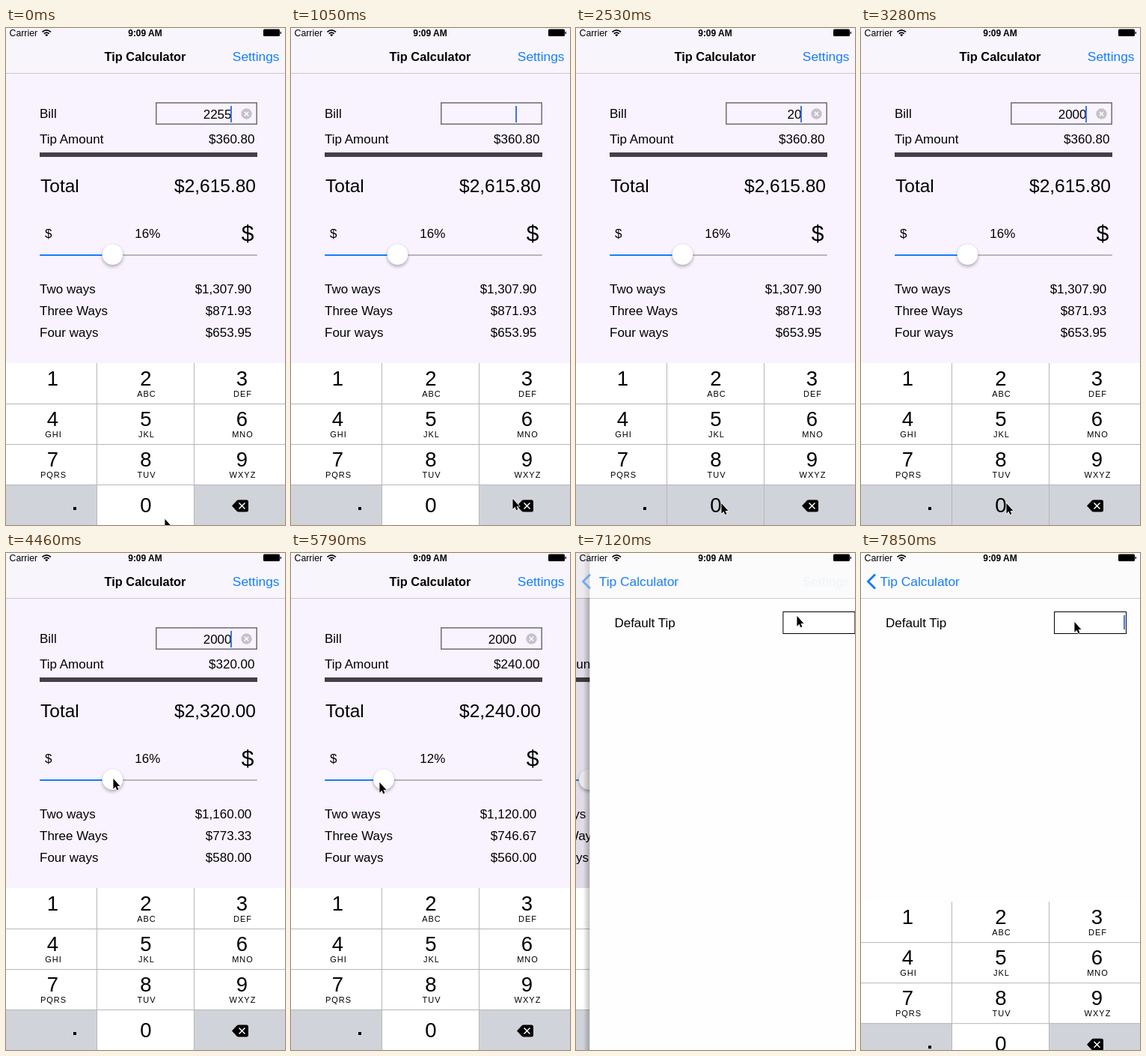
An HTML page for the animation above (8000 ms loop, 373 by 663 pixels).

```html
<!DOCTYPE html>
<html lang="en">
<head>
<meta charset="utf-8">
<title>Tip Calculator</title>
<style>
  html, body { margin: 0; width: 100%; height: 100%; overflow: hidden; background: #fff; }
  svg { display: block; width: 373px; height: 663px; }
  text { font-family: "Liberation Sans", Arial, sans-serif; font-size: 17px; fill: #000; white-space: pre; }
  .end { text-anchor: end; }
  .mid { text-anchor: middle; }
  .big { font-size: 24.5px; }
  .blue { fill: #167efb; font-size: 17.35px; }
  .bold { font-weight: bold; font-size: 16.4px; }
  .digit { font-size: 27.5px; text-anchor: middle; }
  .abc { font-size: 11px; letter-spacing: 1px; text-anchor: middle; }
</style>
</head>
<body>
<svg id="stage" viewBox="0 0 373 663"></svg>
<script>
const LOOP = 8000, STEPS = 54, W = 373;
const GREY = '#d0d3da';

const rect = (x, y, w, h, fill, more = '') =>
  `<rect x="${x}" y="${y}" width="${w}" height="${h}" fill="${fill}" ${more}/>`;
const text = (x, y, str, cls = '', more = '') =>
  `<text x="${x}" y="${y}" class="${cls}" ${more}>${str}</text>`;

function keypad(id) {
  const mids = [62.5, 187, 315.5];
  const letters = ['', 'ABC', 'DEF', 'GHI', 'JKL', 'MNO', 'PQRS', 'TUV', 'WXYZ'];
  let s = rect(0, 447, W, 216, '#fff') + rect(0, 609, 122, 54, GREY);
  s += rect(122, 447, 130, 54, '#fff', `id="${id}2"`);
  s += rect(122, 609, 130, 54, '#fff', `id="${id}0"`);
  s += rect(252, 609, 121, 54, GREY, `id="${id}Del"`);
  for (const y of [501, 555, 609]) s += rect(0, y, W, 1, '#b6b7bc');
  for (const x of [121, 251]) s += rect(x, 447, 1, 216, '#b6b7bc');
  letters.forEach((abc, i) => {
    const x = mids[i % 3], y = 477 + 54 * Math.floor(i / 3);
    s += text(x, y, i + 1, 'digit') + text(x + 1, y + 15, abc, 'abc');
  });
  s += text(187, 646, 0, 'digit') + rect(90, 639, 4, 4, '#000');
  s += '<path d="M302 637.5L308.5 630.5Q309.5 629.5 311 629.5H321.5Q324 629.5 324 632V643Q324 645.5 321.5 645.5H311Q309.5 645.5 308.5 644.5Z"/>';
  s += '<path d="M311.5 633.5l8 8m0 -8l-8 8" stroke="#fff" stroke-width="1.5"/>';
  return `<g id="${id}">${s}</g>`;
}

const billPage = `<g id="billPage">
  ${rect(0, 0, W, 663, '#f8f3ff')}
  ${text(45, 119.5, 'Bill')}
  ${rect(200.8, 99.8, 134.4, 28.4, 'none', 'stroke="#77747c" stroke-width="1.6"')}
  ${text(301.5, 121, '', 'end', 'id="bill"')}
  ${rect(300, 104, 2, 22, '#3f74dd', 'id="caret"')}
  <g id="clear"><circle cx="321.5" cy="114.5" r="7.2" fill="#c5c3ca"/>
    <path d="M318.8 111.8l5.4 5.4m0 -5.4l-5.4 5.4" stroke="#fff" stroke-width="1.4"/></g>
  ${text(45, 153.5, 'Tip Amount')}${text(332.5, 153.5, '', 'end', 'id="tip"')}
  ${rect(45, 166, 291, 6, '#434147')}
  ${text(46, 218.5, 'Total', 'big')}${text(334, 218.5, '', 'end big', 'id="total"')}
  ${text(52, 279.5, '$')}${text(189.3, 279.5, '', 'mid', 'id="pct"')}
  ${text(323, 284, '$', 'mid', 'style="font-size:30px"')}
  ${rect(45, 302, 291, 2, '#b7b4bb', 'rx="1"')}
  ${rect(45, 302, 90, 2, '#167efb', 'rx="1" id="track"')}
  <g id="thumb"><circle cy="304.5" r="14" fill="#000" opacity=".28" filter="url(#soft)"/>
    <circle cy="302" r="14" fill="#fff" stroke="#000" stroke-opacity=".1" stroke-width=".6"/></g>
  ${['Two ways', 'Three Ways', 'Four ways'].map((name, i) =>
    text(45, 353.5 + 29 * i, name) + text(328.3, 353.5 + 29 * i, '', 'end', `id="way${i + 2}"`)).join('')}
  ${rect(0, 0, W, 663, '#000', 'id="dim"')}
</g>`;

const tipPage = `<g id="tipPage">
  ${rect(-9, 0, 9, 663, 'url(#edge)')}
  ${rect(0, 0, W, 663, '#fefefe')}
  ${text(33, 98.5, 'Default Tip')}
  ${rect(258.5, 78.5, 96, 29, '#fff', 'stroke="#000"')}
  ${rect(351, 83, 2, 19, '#3f74dd', 'id="tipCaret"')}
</g>`;

const bars = `
  ${rect(0, 0, W, 60, '#fafafa', 'opacity=".5"')}
  ${rect(0, 60, W, 1, '#000', 'opacity=".19"')}
  <path id="back" d="M19 28.5L9.5 38L19 47.5" fill="none" stroke="#167efb" stroke-width="3"/>
  ${text(0, 44, 'Tip Calculator', 'bold', 'id="title"')}
  ${text(0, 44, 'Tip Calculator', 'blue', 'id="backTitle"')}
  ${text(365.5, 44, 'Settings', 'end blue', 'id="settings"')}
  ${text(4.5, 10.7, 'Carrier', '', 'style="font-size:12.3px"')}
  ${text(186, 10.7, '9:09 AM', 'mid', 'style="font-size:12px;font-weight:bold"')}
  <g fill="none" stroke="#000" stroke-width="1.7">
    <path d="M48.4 5.4Q54.2 .2 60 5.4M50.7 7.7Q54.2 4.6 57.7 7.7"/></g>
  <path d="M54.2 11.3L52 9.1Q54.2 7.4 56.4 9.1Z"/>
  ${rect(344, 1.6, 22, 9.4, '#000', 'rx="1.6"')}
  ${rect(366.6, 4.8, 1.3, 3.2, '#000', 'rx=".6"')}`;

document.getElementById('stage').innerHTML = `
  <defs>
    <filter id="soft" x="-50%" y="-50%" width="200%" height="200%"><feGaussianBlur stdDeviation="2"/></filter>
    <linearGradient id="edge"><stop offset="0" stop-opacity="0"/><stop offset="1" stop-opacity=".25"/></linearGradient>
  </defs>
  ${billPage}${keypad('pad')}${tipPage}${keypad('tipPad')}${bars}
  <g id="cursor"><path d="M.5 0V16L4 12.6L6.2 17.8L8.6 16.7L6.4 11.6H11Z" transform="scale(.86)"
    stroke="#fff" stroke-width="1.4" paint-order="stroke"/></g>`;

const el = {};
document.querySelectorAll('[id]').forEach(e => { el[e.id] = e; });
const set = (id, name, value) => el[id].setAttribute(name, value);
const move = (id, x, y = 0) => set(id, 'transform', `translate(${x} ${y})`);
const show = (id, on) => set(id, 'opacity', +on);

// Timelines are in steps; values between keys are linear.
const pointer = [[0, 212, 655], [1, 238, 648], [3, 296, 628], [7, 296, 628], [11, 185, 475],
  [13, 185, 475], [16, 194, 634], [23, 194, 634], [26, 143, 302], [30, 143, 301],
  [34, 99, 304], [39, 118, 306], [40, 118, 306], [43, 332, 42], [45, 332, 42],
  [48, 295, 84], [50, 285, 92]];
const slider = [[30, 142.5], [34, 100], [35, 105], [39, 124]];
const typed = [[0, '2255'], [3, '225'], [5, '22'], [6, '2'], [7, ''], [12, '2'],
  [17, '20'], [20, '200'], [22, '2000']];

function at(keys, n) {
  const i = keys.findIndex(k => k[0] > n);
  if (i < 0) return keys[keys.length - 1].slice(1);
  if (i === 0) return keys[0].slice(1);
  const [a, b] = [keys[i - 1], keys[i]];
  const f = (n - a[0]) / (b[0] - a[0]);
  return a.slice(1).map((v, j) => v + (b[j + 1] - v) * f);
}

// Critically damped approach from 0 to 1.
function spring(d) {
  const x = 1.19 * Math.max(0, d);
  return 1 - (1 + x) * Math.exp(-x);
}

const money = v => '$' + v.toFixed(2).replace(/\B(?=(\d{3})+\.)/g, ',');

function draw(ms) {
  // The small lead keeps steps from landing late through rounding.
  const n = Math.min(STEPS - 1, Math.floor((ms + 10) / LOOP * STEPS));

  const [since, bill] = typed.filter(k => k[0] <= n).pop();
  el.bill.textContent = bill;
  show('clear', bill !== '');
  show('caret', (n - since) * LOOP / STEPS % 1000 < 500 || n < 3);

  const [x] = at(slider, n);
  const pct = Math.round((x - 59) / 263 * 50);
  const amount = n < 27 ? 2255 : 2000;
  const total = amount * (1 + pct / 100);
  move('thumb', x);
  set('track', 'width', x - 45);
  el.pct.textContent = pct + '%';
  el.tip.textContent = money(amount * pct / 100);
  el.total.textContent = money(total);
  for (const k of [2, 3, 4]) el['way' + k].textContent = money(total / k);

  set('pad2', 'fill', n === 12 ? GREY : '#fff');
  set('pad0', 'fill', [17, 20, 22].includes(n) ? GREY : '#fff');
  set('padDel', 'fill', n >= 3 && n < 7 ? '#fff' : GREY);

  const p = n >= 49 ? 1 : spring(n - 44);
  move('billPage', -0.3 * W * p);
  move('pad', -W * p);
  move('tipPage', W * (1 - p));
  show('tipPage', p > 0);
  set('dim', 'opacity', 0.1 * p);
  set('title', 'x', 131.5 - 106 * p);
  set('title', 'opacity', 1 - p);
  set('backTitle', 'x', 25.5 + 106 * (1 - p));
  set('backTitle', 'opacity', p);
  set('back', 'opacity', p ** 12);
  set('settings', 'opacity', 1 - p);

  show('tipCaret', n >= 50);
  move('tipPad', 0, 216 * (1 - spring(n - 49.55)));
  move('cursor', ...at(pointer, n));
}

const start = performance.now();
function tick() {
  draw((performance.now() - start) % LOOP);
  requestAnimationFrame(tick);
}
tick();
</script>
</body>
</html>
```
